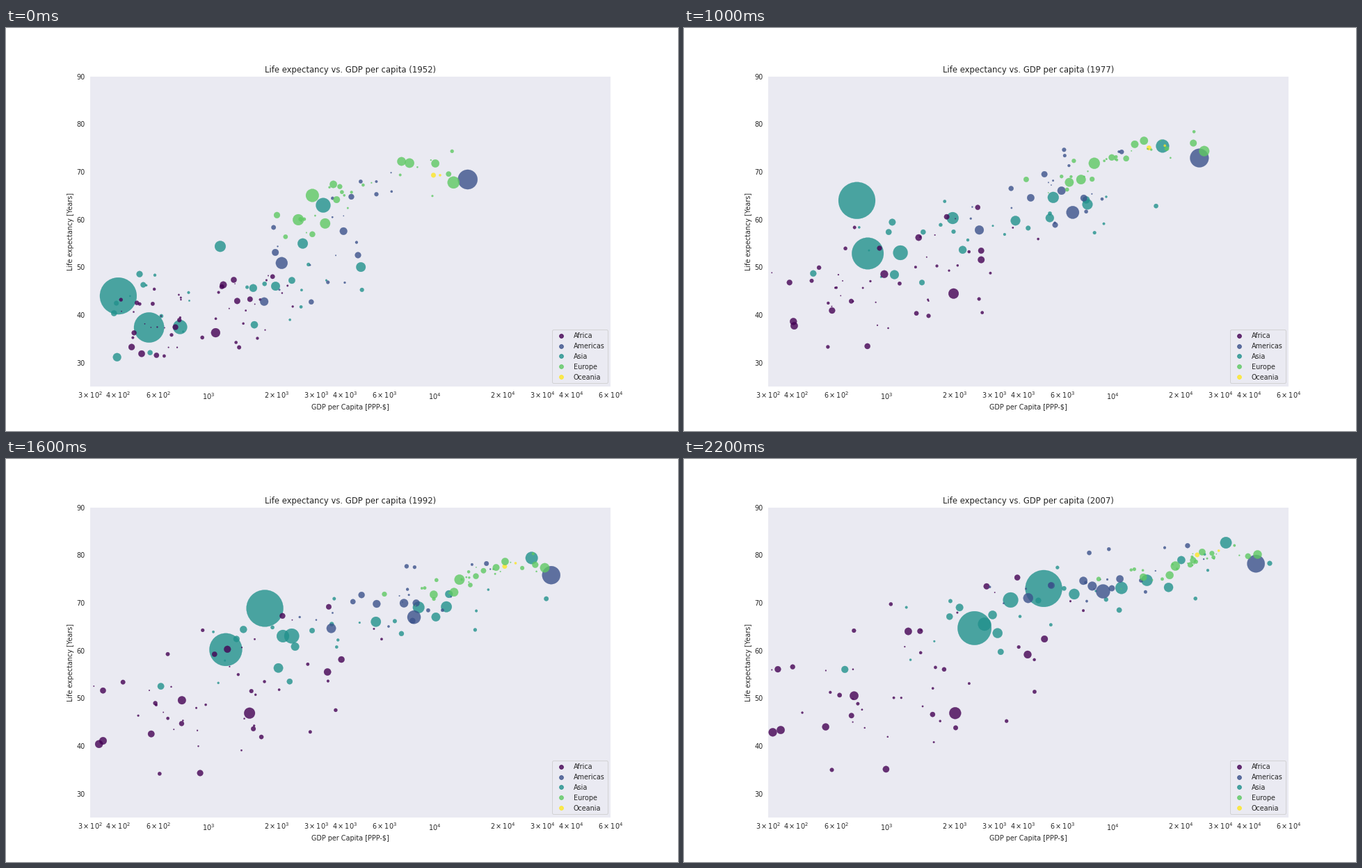
Recreate the animation shown at these times as a matplotlib script. Size 966 px wide and 580 px high, loop 2400 ms.

```python
import numpy as np
import matplotlib.pyplot as plt
from matplotlib.animation import FuncAnimation
from matplotlib.lines import Line2D

W, H, DPI = 966, 580, 69.55
STEPS = 12
FRAMES = np.arange(STEPS)
T = FRAMES / (STEPS - 1)
INK, PANEL = "0.15", "#eaeaf2"
ALPHA = 0.8

COLORS = {"Africa": "#440154", "Americas": "#3b528b", "Asia": "#21918c",
          "Europe": "#5ec962", "Oceania": "#fde725"}

# Biggest bubbles: continent, share of the largest population at both ends,
# then key points (step, GDP, life expectancy).
LEADERS = [
    ("Asia", 1, 1, [(0, 400, 44), (1, 576, 50.5), (2, 488, 44.5), (3, 613, 58.4),
                    (5, 741, 64), (7, 1379, 67.3), (9, 2289, 70.4), (11, 4959, 73)]),
    ("Asia", .67, .84, [(0, 547, 37.4), (3, 701, 47.2), (7, 977, 58.6),
                        (9, 1459, 61.8), (11, 2452, 64.7)]),
    ("Asia", .147, .169, [(0, 750, 37.5), (3, 762, 46), (7, 1748, 60.1),
                          (9, 3119, 66), (11, 3541, 70.6)]),
    ("Asia", .156, .097, [(0, 3217, 63), (3, 9848, 71.4), (5, 16610, 75.4),
                          (8, 26825, 79.4), (11, 31656, 82.6)]),
    ("Americas", .283, .228, [(0, 13990, 68.4), (3, 19530, 70.8), (7, 29884, 75),
                              (11, 42952, 78.2)]),
    ("Americas", .102, .144, [(0, 2109, 50.9), (3, 3430, 57.6), (5, 6660, 61.5),
                              (7, 7807, 65.2), (11, 9066, 72.4)]),
    ("Africa", .06, .102, [(0, 1077, 36.3), (3, 1014, 41), (5, 1982, 44.5),
                           (7, 1385, 46.9), (11, 2014, 46.9)]),
]

# Other countries: count, (log GDP, spread, life, spread, correlation) at both
# ends, then the largest share at both ends and its decay by rank.
CLOUDS = {
    "Asia": (28, (3.15, .36, 46, 7.5, .5), (3.75, .45, 70, 6, .75), (.088, .125, 7)),
    "Africa": (51, (2.98, .24, 39.5, 4.5, .3), (3.14, .36, 54, 8.5, .4), (.034, .055, 12)),
    "Americas": (23, (3.5, .2, 53, 8, .6), (3.87, .25, 74, 3.5, .6), (.05, .07, 5)),
    "Oceania": (2, (4.01, .01, 69.2, .2, 0), (4.47, .05, 80.7, .4, .9), (.016, .015, .7)),
    "Europe": (30, (3.7, .24, 65, 4.5, .75), (4.34, .22, 78, 2.3, .85), (.125, .062, 6)),
}

rng = np.random.default_rng(19)
paths, tints = [], []


def add(group, gdp, life, first, last):
    share = first * (last / first) ** T
    paths.append((gdp, life, 3000 * share))
    tints.append(COLORS[group])


def place(stats, u, v):
    x, dx, y, dy, corr = stats
    return np.array([x + dx * u, y + dy * (corr * u + np.sqrt(1 - corr ** 2) * v)])


def add_cloud(group):
    count, first, last, (s0, s1, decay) = CLOUDS[group]
    for rank in range(count):
        u, v, du, dv, phase = rng.uniform(-1.7, 1.7, 5)
        x0, y0 = place(first, u, v)
        x1, y1 = place(last, .75 * u + .65 * du, .6 * v + .8 * dv)
        ease = T ** .8
        wobble = .04 * np.sin(7 * T + 2 * phase) * np.sin(np.pi * T)
        gdp = 10 ** (x0 + (x1 - x0) * ease + wobble)
        fade = np.exp(-rank / decay)
        add(group, np.clip(gdp, 312, None), y0 + (y1 - y0) * ease,
            s0 * fade, s1 * fade)


for group in ("Asia", "Africa", "Americas", "Oceania", "Europe"):
    for name, first, last, keys in LEADERS:
        if name == group:
            step, gdp, life = np.transpose(keys)
            add(name, 10 ** np.interp(FRAMES, step, np.log10(gdp)),
                np.interp(FRAMES, step, life), first, last)
    add_cloud(group)
paths = np.array(paths)

plt.rcParams.update({
    "font.family": "DejaVu Sans", "font.size": 10, "text.color": INK,
    "axes.labelcolor": INK, "xtick.color": INK, "ytick.color": INK,
    "axes.facecolor": PANEL,
})
# The tiny surplus keeps the canvas from being truncated by a pixel.
fig, ax = plt.subplots(figsize=((W + 1e-6) / DPI, (H + 1e-6) / DPI), dpi=DPI)
fig.subplots_adjust(left=.125, right=.9, bottom=.11, top=.88)
for spine in ax.spines.values():
    spine.set_visible(False)

ax.set_xscale("log")
ax.set_xlim(300, 60000)
ax.set_ylim(25, 90)


def sci(value):
    power = int(np.log10(value) + 1e-9)
    lead = round(value / 10 ** power)
    head = "" if lead == 1 else rf"{lead}\times"
    return rf"$\mathdefault{{{head}10^{{{power}}}}}$"


major = [1e3, 1e4]
minor = [k * d for d in (100, 1000, 10000) for k in (2, 3, 4, 6)][1:]
ax.set_xticks(major, [sci(v) for v in major])
ax.set_xticks(minor, [sci(v) for v in minor], minor=True)
ax.set_yticks(range(30, 91, 10))
ax.tick_params(which="major", length=0, pad=7)
ax.tick_params(which="minor", length=0, pad=5.5)
ax.set_xlabel("GDP per Capita [PPP-$]")
ax.set_ylabel("Life expectancy [Years]")
title = ax.set_title("", fontsize=12)

dots = ax.scatter(paths[:, 0, 0], paths[:, 1, 0], s=paths[:, 2, 0],
                  c=tints, alpha=ALPHA, linewidths=.3, zorder=2)
handles = [Line2D([], [], ls="", marker="o", ms=6, color=c, alpha=ALPHA, label=n)
           for n, c in COLORS.items()]
ax.legend(handles=handles, loc="lower right", numpoints=1, facecolor=PANEL,
          edgecolor="0.8", framealpha=.8)


def draw(i):
    dots.set_offsets(paths[:, :2, i])
    dots.set_sizes(paths[:, 2, i])
    title.set_text(f"Life expectancy vs. GDP per capita ({1952 + 5 * i})")
    return dots, title


anim = FuncAnimation(fig, draw, frames=STEPS, interval=200,
                     repeat=True, repeat_delay=0, blit=False)
plt.show()
```
